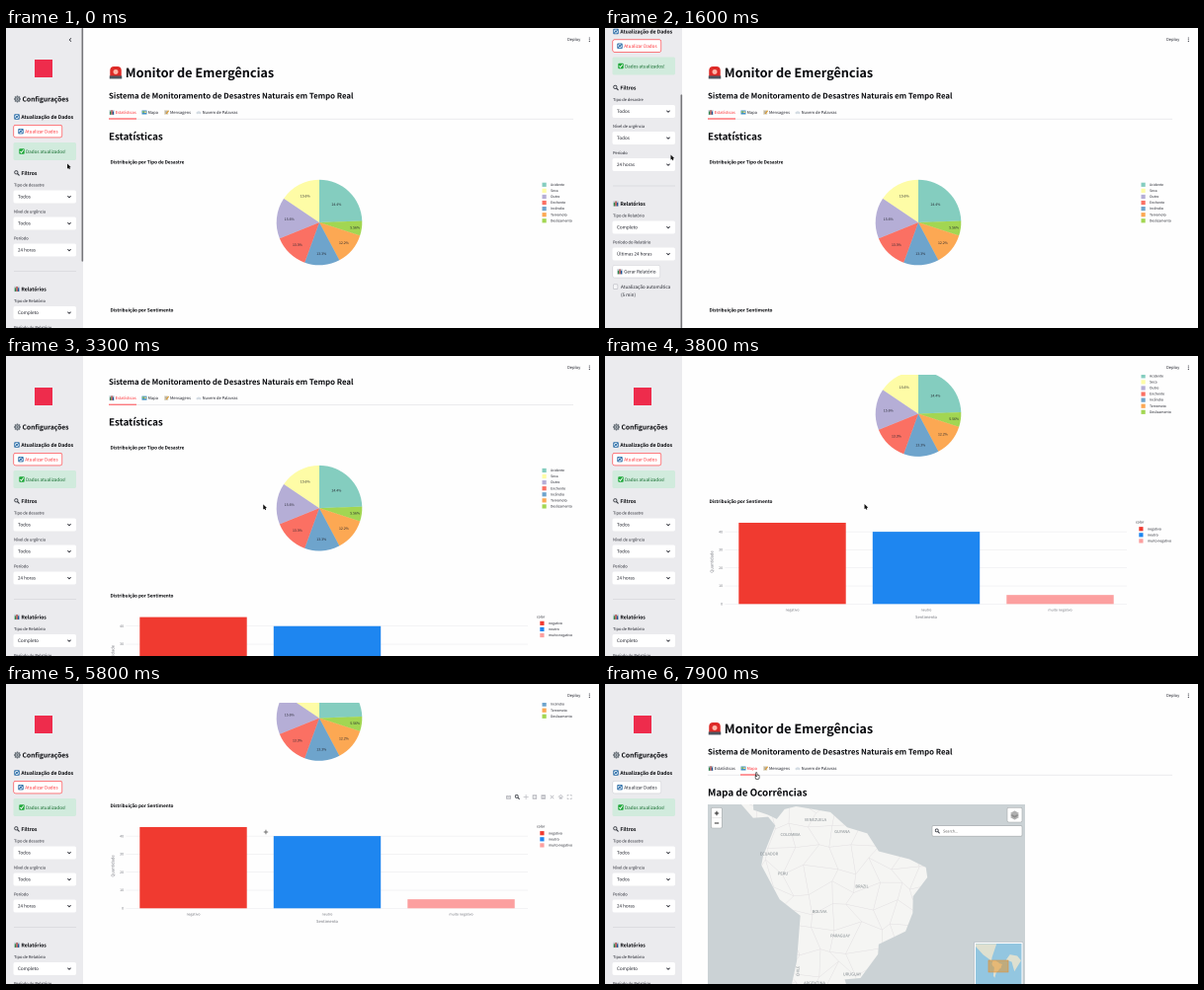
An HTML page with a canvas that plays this animation: 600x304 px, repeating every 8 s.

```html
<!DOCTYPE html>
<html lang="pt">
<head>
<meta charset="utf-8">
<style>
html, body { margin: 0; width: 100%; height: 100%; overflow: hidden; background: #fefefe }
canvas { display: block; width: 600px; height: 304px }
</style>
</head>
<body>
<canvas id="stage"></canvas>
<script>
const W = 600, H = 304, LOOP = 8000;
const INK = '#23252e', DARK = '#08090d', RED = '#ff2f35', GREY = '#74767e', FAINT = '#bbbcc2';
const FONT = '"Noto Sans CJK JP", "Noto Sans CJK SC", "Noto Sans", sans-serif';
const canvas = document.getElementById('stage'), c = canvas.getContext('2d');
const scale = 2 * (window.devicePixelRatio || 1); // drawn double for smooth small text
canvas.width = W * scale;
canvas.height = H * scale;
c.textRendering = 'geometricPrecision';

// ---------- helpers ----------
function text(s, x, y, size, color = INK, bold = false, align = 'left') {
  c.font = `${bold ? 700 : 400} ${size}px ${FONT}`;
  c.fillStyle = color;
  c.textAlign = align;
  c.fillText(s, x, y + size * 0.35);
}
function at(x, y, draw, size = 1, angle = 0) {
  c.save();
  c.translate(x, y);
  c.rotate(angle);
  c.scale(size, size);
  draw();
  c.restore();
}
const turned = (s, x, y, size, color) =>
  at(x, y, () => text(s, 0, 0, size, color, false, 'center'), 1, -Math.PI / 2);
function rect(x, y, w, h, color) {
  c.fillStyle = color;
  c.fillRect(x, y, w, h);
}
function box(x, y, w, h, fill, stroke, r = 2) {
  c.beginPath();
  c.roundRect(x, y, w, h, r);
  c.fillStyle = fill;
  c.fill();
  if (stroke) { c.strokeStyle = stroke; c.lineWidth = 0.6; c.stroke(); }
}
function disc(x, y, r, color) {
  c.beginPath();
  c.arc(x, y, r, 0, 7);
  c.fillStyle = color;
  c.fill();
}
function line(color, width, ...p) {
  c.beginPath();
  for (let i = 0; i < p.length; i += 2) c.lineTo(p[i], p[i + 1]);
  c.strokeStyle = color;
  c.lineWidth = width;
  c.stroke();
}
function cross(color, width, r) {
  line(color, width, -r, 0, r, 0);
  line(color, width, 0, -r, 0, r);
}
function clipped(x, y, w, h, draw) {
  c.save();
  c.beginPath();
  c.rect(x, y, w, h);
  c.clip();
  draw();
  c.restore();
}
function ease(t, from, to) {
  const u = Math.min(1, Math.max(0, (t - from) / (to - from)));
  return u * u * (3 - 2 * u);
}

// ---------- icons, drawn in a box from -5 to 5 ----------
const icons = {
  chart() {
    rect(-5, -5, 10, 10, '#c3ced6');
    ['#2c8a4c', '#b8413e', '#1f5596'].forEach((color, i) =>
      rect(-4 + i * 2.9, i === 1 ? -4.5 : -2, 2.4, i === 1 ? 9 : 6.5, color));
  },
  sync() {
    box(-5, -5, 10, 10, '#2f6fa8', null, 1.5);
    disc(0, 0, 3.6, '#dcebf5');
    disc(0, 0, 1.9, '#2f6fa8');
    line('#2f6fa8', 1.3, -4, 3, 4, -3);
  },
  check() {
    box(-5, -5, 10, 10, '#1fa83a', null, 1.5);
    line('#fff', 1.7, -3, 0, -0.8, 2.6, 3.2, -3);
  },
  glass() {
    c.beginPath();
    c.arc(-1.2, -1.2, 3, 0, 7);
    c.strokeStyle = '#33373f';
    c.lineWidth = 1.5;
    c.stroke();
    line('#33373f', 2, 1, 1, 4.6, 4.6);
  },
  gear() {
    for (let i = 0; i < 4; i++) at(0, 0, () => line('#6a727a', 2, -5, 0, 5, 0), 1, i * Math.PI / 4);
    disc(0, 0, 4, '#6a727a');
    disc(0, 0, 2.3, '#b9bfc5');
    disc(0, 0, 1.2, '#596068');
  },
  siren() {
    box(-4.6, -5, 9.2, 8.5, '#dd2a27', null, [3, 3, 0, 0]);
    box(-2, -2.6, 4, 4, '#ffb5a8', null, 2);
    rect(-5, 2.6, 10, 2.4, '#4c535d');
  },
  map() {
    rect(-5, -4, 10, 8, '#3f8fc4');
    rect(-4, -3, 3, 4, '#8ac36c');
    rect(0, -2, 4, 3, '#e4d38a');
  },
  note() {
    rect(-4.5, -4.5, 8, 9, '#ddd5c0');
    for (const y of [-2.5, 0, 2.5]) line('#8b8b8b', 0.8, -3, y, 2, y);
    line('#e09a28', 2, 4.6, -3.5, -0.5, 2.5);
  },
  cloud() {
    for (const x of [-2.6, 0, 2.6]) disc(x, 1 - (x === 0), 2.4, '#d3dbe2');
  },
  camera() {
    box(-5, -3, 10, 7.5, FAINT, null, 1);
    disc(0, 0.8, 2.4, '#fff');
    disc(0, 0.8, 1.4, FAINT);
  },
  pan() { cross(FAINT, 1.5, 5); },
  minus() {
    box(-4.5, -4.5, 9, 9, FAINT, null, 1);
    line('#fff', 1.5, -3, 0, 3, 0);
  },
  plus() {
    box(-4.5, -4.5, 9, 9, FAINT, null, 1);
    cross('#fff', 1.5, 3);
  },
  auto() { at(0, 0, icons.pan, 1, Math.PI / 4); },
  home() {
    line(FAINT, 1.5, -5, 0, 0, -4, 5, 0);
    rect(-3, 0, 6, 4, FAINT);
  },
  expand() {
    for (const x of [-4, 4]) for (const y of [-4, 4])
      line(FAINT, 1.4, x / 3, y, x, y, x, y / 3);
  }
};
const icon = (name, x, y, size = 5) => at(x, y, icons[name], size / 10);

// ---------- sidebar ----------
function select(label, value, y) {
  text(label, 8, y, 4);
  box(7.5, y + 5.5, 63.5, 13, '#fff');
  text(value, 12, y + 12, 4.57);
  line(INK, 0.9, 62.4, y + 11.2, 64, y + 12.8, 65.6, y + 11.2);
}
function heading(name, s, y) {
  icon(name, 11, y, 5.5);
  text(s, 15.4, y, 5.05, DARK, true);
}
function button(name, s, y, w, color = INK, border = '#cfd0d5') {
  box(7.8, y, w, 12.6, '#fff', border);
  icon(name, 15, y + 6.4, 5.4);
  text(s, 19.2, y + 6.4, 4.6, color);
}
function sidebar(scroll, hover, bar, focused) {
  rect(0, 0, 78, H, '#ebebee');
  at(0, -scroll, () => {
    if (hover) line(INK, 0.7, 66, 10.2, 64.2, 12, 66, 13.8);
    rect(29, 32, 18, 18, '#ee2c4c');
    icon('gear', 11.5, 72, 7);
    text('Configurações', 16.5, 72.3, 6.7, DARK, true);
    heading('sync', 'Atualização de Dados', 90);
    button('sync', 'Atualizar Dados', 98.3, 49, ...(focused ? [RED, RED] : []));
    box(7.5, 116, 63.5, 18, '#d1ebdd');
    icon('check', 16, 125, 5.4);
    text('Dados atualizados!', 20, 125.2, 4.6, '#0f6a2a');
    heading('glass', 'Filtros', 147);
    select('Tipo de desastre', 'Todos', 159);
    select('Nível de urgência', 'Todos', 186);
    select('Período', '24 horas', 213);
    line('#cdced3', 0.5, 8, 246.5, 71, 246.5);
    heading('chart', 'Relatórios', 264.5);
    select('Tipo de Relatório', 'Completo', 276.5);
    select('Período do Relatório', 'Últimas 24 horas', 303.5);
    button('chart', 'Gerar Relatório', 327, 48);
    box(8.3, 346.3, 4.6, 4.6, '#f6f6f8', '#b9bac1', 1);
    text('Atualização automática', 16, 349, 4.6);
    text('(5 min)', 16, 357, 4.6);
  });
  if (bar) box(76.5, scroll * H / 390.5, 1.7, H * H / 390.5, '#77777b', null, 0.8);
}

// ---------- charts ----------
const kinds = [ // name, count, colour, clockwise from the top
  ['Acidente', 22, '#84cdbf'], ['Deslizamento', 5, '#a2d652'], ['Terremoto', 11, '#fca853'], ['Incêndio', 12, '#6ea4cc'],
  ['Enchente', 12, '#fb7063'], ['Outro', 14, '#b5aed6'], ['Seca', 14, '#fefca6']
];
const moods = [['negativo', 45, '#f03a30'], ['neutro', 40, '#1e86f0'], ['muito negativo', 5, '#fc9f9f']];

function legend(name, color, x, y, gap) {
  rect(x, y - 2, 4.2, 4.2, color);
  text(name, x + gap, y, 3.45);
}
function pie(tools) {
  text('Distribuição por Tipo de Desastre', 105.5, 136, 4.6, DARK, true);
  if (tools) { icon('camera', 560, 128); icon('expand', 570, 128); }
  const x = 317, y = 197, r = 43.3, total = 90;
  let a = -Math.PI / 2;
  kinds.forEach(([name, count, color], i) => {
    const b = a + count / total * 2 * Math.PI, mid = (a + b) / 2;
    const out = r * (0.92 - 0.0155 * count); // small slices carry their label further out
    c.beginPath();
    c.moveTo(x, y);
    c.arc(x, y, r, a, b);
    c.fillStyle = color;
    c.fill();
    const share = (count / total * 100).toPrecision(3) + '%';
    text(share, x + out * Math.cos(mid), y + out * Math.sin(mid), 3.45, INK, false, 'center');
    legend(name, color, 542.5, 158.7 + (kinds.length - i) % kinds.length * 6.08, 8.5);
    a = b;
  });
}
function bars(tools) {
  text('Distribuição por Sentimento', 105.5, 286, 4.6, DARK, true);
  if (tools) ['camera', 'glass', 'pan', 'plus', 'minus', 'auto', 'home', 'expand']
    .forEach((name, i) => icon(name, 508.5 + i * 8.8, 277));
  const base = 389.8, unit = 1.83;
  for (let v = 0; v <= 40; v += 10) {
    const y = base - v * unit;
    line('#e9e9ec', 0.5, 121.5, y, 528, y);
    text(v, 119, y, 3.45, GREY, false, 'right');
  }
  moods.forEach(([name, v, color], i) => {
    const x = 135.3 + i * 135.5;
    rect(x, base - v * unit, 108.4, v * unit, color);
    text(name, x + 54.2, 395.6, 3.45, GREY, false, 'center');
    legend(name, color, 540.3, 313.6 + i * 6.1, 8.7);
  });
  text('color', 537, 307, 3.45);
  text('Sentimento', 325, 403, 4, GREY, false, 'center');
  turned('Quantidade', 108, 347, 4, GREY);
}

// ---------- map, Mercator ----------
const lonX = lon => 452.5 + 3.62 * lon;
const latY = lat => 167 - 3.62 * 180 / Math.PI * Math.log(Math.tan(Math.PI / 4 + lat * Math.PI / 360));
function shape(...p) {
  const path = new Path2D();
  for (let i = 0; i < p.length; i += 2) path.lineTo(lonX(p[i]), latY(p[i + 1]));
  return path;
}
const coast = shape(
  -87.5, 13, -83.6, 8.6, -79.4, 8.9, -77.4, 6.5, -80.8, -2, -81.3, -4.6, -76.2, -14, -70.4, -18.4, -71.4, -30,
  -73.5, -38, -74.5, -50, -68, -55, -62, -40, -57, -37, -58, -34.3, -53.6, -34, -48.7, -28.3, -48.5, -25.8,
  -41, -22.5, -39, -17.7, -38.9, -13.2, -34.9, -8, -35.3, -5.2, -39.9, -2.9, -48.5, -0.7, -51.7, 4.3, -57.3, 6,
  -62, 10.2, -71.6, 11.8, -74.8, 11, -77, 8.3, -79.5, 9.5, -83.5, 10.8, -83.6, 13
);
const north = shape(-165, 65, -60, 65, -80, 26, -83, 10, -120, 35);
const africa = shape(-17, 15, 0, 36, 33, 31, 50, 11, 20, -35, 8, 5);
const countries = [
  ['VENEZUELA', 213, 137.5], ['GUYANA', 240, 149.5], ['COLOMBIA', 187.5, 152.5], ['ECUADOR', 166, 172],
  ['PERU', 180, 192], ['BRAZIL', 260, 205], ['BOLIVIA', 217, 230.5], ['PARAGUAY', 238, 255],
  ['URUGUAY', 250, 294], ['ARGENTINA', 212, 303]
];

// Inner borders: a net of seeded, shaken grid points
function borderNet(step = 21) {
  const net = new Path2D();
  const shake = (i, j) => (Math.sin(i * 127.1 + j * 311.7) * 43758.5 % 1) * step * 0.45;
  const node = (i, j) => [104 + i * step + shake(i, j), 122 + j * step + shake(j + 40, i)];
  for (let i = 0; i < 12; i++) for (let j = 0; j < 10; j++)
    for (const next of [node(i + 1, j), node(i, j + 1)]) {
      net.moveTo(...node(i, j));
      net.lineTo(...next);
    }
  return net;
}
const borders = borderNet();

function miniMap() {
  box(373.5, 261.5, 49.5, 50, '#fff', '#aab4bc', 1);
  clipped(375, 263, 46.5, 48, () => {
    rect(375, 263, 47, 48, '#93c6e0');
    at(388, 280, () => {
      c.translate(-104, -122);
      c.fillStyle = '#dfe0d0';
      for (const land of [coast, north, africa]) c.fill(land);
    }, 20 / 321);
    box(388, 280, 20, 12, 'rgba(235,145,30,.5)', '#e0913a', 0);
  });
}
function mapView(loaded) {
  text('Mapa de Ocorrências', 104, 110, 9.82, DARK, true);
  clipped(104, 122, 321, 182, () => {
    rect(104, 122, 321, 182, loaded ? '#cbd2d5' : '#dddddd');
    if (loaded) {
      c.save();
      c.clip(coast);
      rect(104, 122, 321, 182, '#f5f5f3');
      c.strokeStyle = '#e2dfe1';
      c.lineWidth = 0.5;
      c.stroke(borders);
      c.restore();
      for (const [name, x, y] of countries) text(name, x, y, 4, '#7f878c', false, 'center');
      turned('CHILE', 195, 291, 3.8, '#7f878c');
    }
    box(107.5, 125.5, 10.8, 20.5, '#fff', '#a8acae', 1.2);
    line('#c9c9c9', 0.4, 107.5, 135.8, 118.3, 135.8);
    at(113, 131, () => cross('#111', 0.9, 2.2));
    line('#111', 0.9, 110.8, 141, 115.2, 141);
    box(407, 125.3, 15, 14.7, '#fff', '#a8acae', 1.5);
    for (const y of [135, 133, 131])
      at(414.5, y, () => {
        c.scale(1.7, 1);
        c.rotate(Math.PI / 4);
        rect(-1.9, -1.9, 3.8, 3.8, y === 133 ? '#8d8d8d' : '#b0b0b0');
      });
    box(331, 143.7, 91, 10.5, '#fff', '#a8acae', 1.2);
    icon('glass', 336.3, 149);
    text('Search...', 342, 149, 3.8, '#666');
    miniMap();
  });
}

// ---------- page ----------
const tabs = [['chart', 'Estatísticas', 107], ['map', 'Mapa', 140], ['note', 'Mensagens', 162.4], ['cloud', 'Nuvem de Palavras', 195]];

function page(t, scroll, onMap, overMap) {
  rect(78, 0, 522, H, '#fefefe');
  at(0, -scroll, () => {
    icon('siren', 111, 45.2, 12.5);
    text('Monitor de Emergências', 120.8, 45.5, 12.68, DARK, true);
    text('Sistema de Monitoramento de Desastres Naturais em Tempo Real', 104, 69, 7.77, DARK, true);
    tabs.forEach(([name, label, x], i) => {
      icon(name, x, 85.5);
      text(label, x + 3.6, 85.6, 4.05, i === +onMap || (i === 1 && overMap) ? RED : INK);
    });
    line('#dfdfe3', 0.6, 104, 92.2, 574, 92.2);
    const slide = ease(t, 7500, 7700);
    line(RED, 0.9, 104 + 33 * slide, 92, 132 + 23 * slide, 92);
    if (onMap) mapView(t >= 7700);
    else {
      text('Estatísticas', 104, 110, 9.82, DARK, true);
      pie((t >= 2400 && t < 3000) || (t >= 6300 && t < 6500));
      bars(t >= 4300 && t < 6000);
    }
  });
  rect(78, 0, 522, 19, '#fefefe');
  text('Deploy', 568, 11.8, 4.05);
  for (const y of [10, 11.8, 13.6]) disc(590.3, y, 0.55, INK);
}

const pointers = {
  cross() { cross('#555', 0.8, 2.2); },
  hand() {
    box(-1.7, 0.6, 4, 4.2, '#fff', '#222', 1.3);
    box(-1.2, -2, 1.3, 4.2, '#fff', '#222', 0.6);
  },
  arrow() {
    line('#111', 1, 1.2, 3, 2.4, 5.6);
    c.beginPath();
    c.lineTo(0, 0);
    c.lineTo(0, 5);
    c.lineTo(3.6, 3.5);
    c.fill();
  }
};

const route = [ // time, x, y
  [0, 62, 137.5], [1600, 66.5, 128.5], [2100, 67, 130], [2600, 256.5, 151],
  [3800, 262.5, 150], [6200, 263, 150], [6800, 132, 89], [7000, 132, 89], [7300, 153.8, 91.5]
];
function mouseAt(t) {
  let [, x, y] = route[0];
  for (let i = 1; i < route.length; i++) {
    const [time, nx, ny] = route[i], u = ease(t, route[i - 1][0], time);
    x += (nx - x) * u;
    y += (ny - y) * u;
  }
  return [x, y];
}

function draw(now) {
  const t = Math.floor(now % LOOP / 100) * 100; // ten pictures a second
  const [x, y] = mouseAt(t), onMap = t >= 7500, overMap = t > 6900 && x > 137;
  const sideScroll = 86.5 * (ease(t, 300, 1000) - ease(t, 1800, 2300));
  const pageScroll = 162.5 * (ease(t, 2900, 4088) - ease(t, 5900, 6300));
  c.setTransform(scale, 0, 0, scale, 0, 0);
  clipped(78, 0, 522, H, () => page(t, pageScroll, onMap, overMap));
  clipped(0, 0, 78.3, H, () => sidebar(sideScroll, x < 78, t < 2400, !onMap));
  c.fillStyle = '#111';
  at(x, y, pointers[t >= 4300 && t < 6000 ? 'cross' : overMap ? 'hand' : 'arrow']);
}

const start = performance.now();
function tick() {
  draw(performance.now() - start);
  requestAnimationFrame(tick);
}
tick();
</script>
</body>
</html>
```
